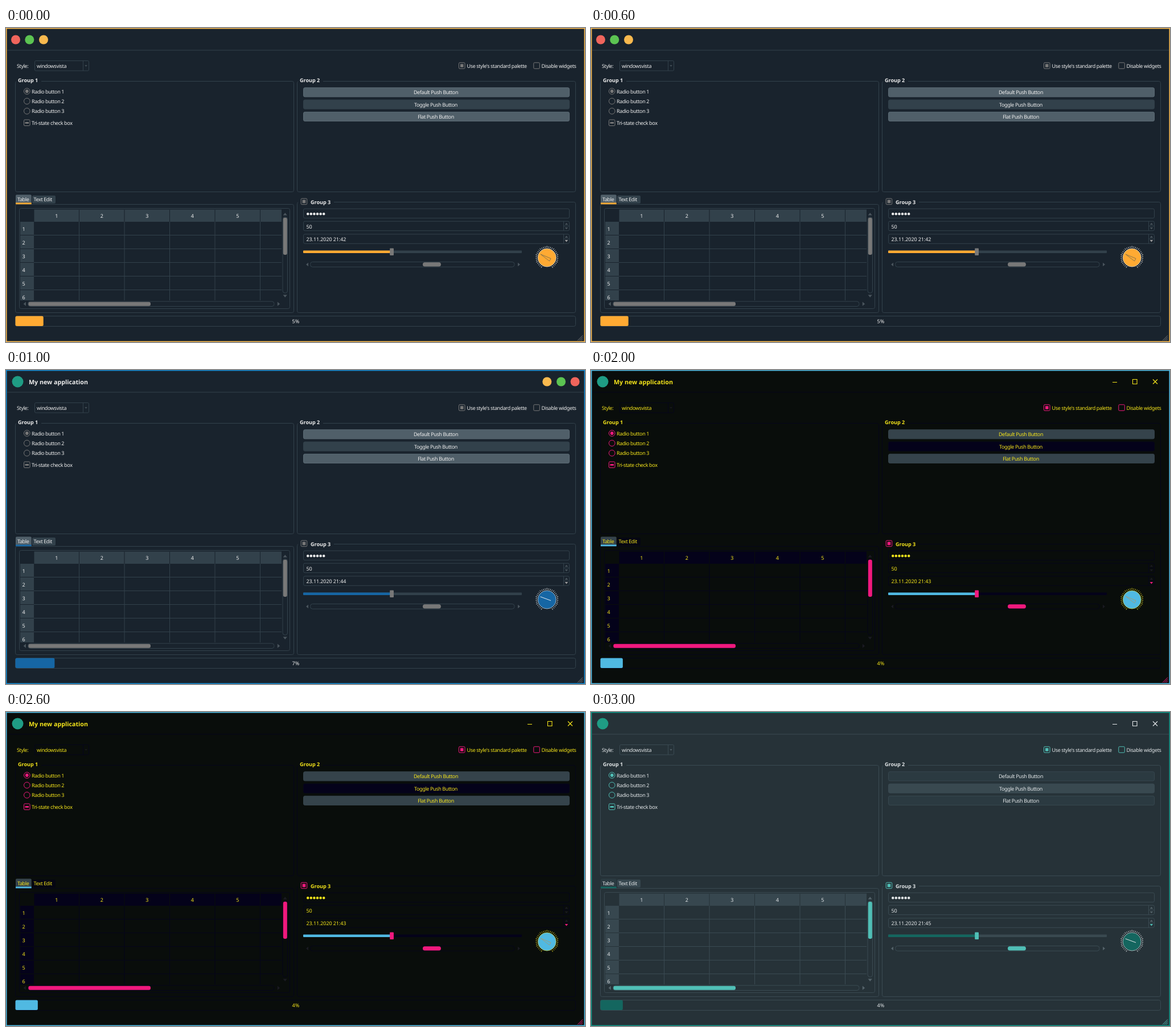
Recreate the animation shown at these times as an HTML page. Size 1017x551 px, loop 4000 ms.

```html
<!DOCTYPE html>
<html lang="en">
<head>
<meta charset="utf-8">
<title>Themed window</title>
<style>
html, body { margin: 0; width: 100%; height: 100%; overflow: hidden; background: #19232d; }
svg {
  display: block; width: 1017px; height: 551px;
  --bg: #19232d; --line: #32414b; --text: #eeeeee; --head: #32414b; --btn: #505f69; --btnLine: #5b6a74;
  --toggle: #32414b; --tab: #505f69; --tab2: #32414b; --grip: #787878; --arrow: #4a555d; --down: #a0a0a0;
  --groove: #32414b; --tick: #d8dcde;
}
.amber { --accent: #ffaa33; --frame: #f8b84e; --needle: #8a7448; }
.blue { --accent: #1666a4; --frame: #168bd2; --needle: #e6edf2; }
.neon {
  --bg: #090d0b; --line: #05051a; --text: #f5e51b; --head: #04021a; --btn: #35434b; --btnLine: #35434b;
  --toggle: #04021a; --tab: #35434b; --tab2: #050612; --grip: #f0197d; --arrow: #1a1a22; --down: #f0197d;
  --groove: #04021a; --tick: #d8cb1c; --accent: #50b9e2; --frame: #50b9e2; --needle: #9a9f80;
}
.teal {
  --bg: #263238; --line: #3a4a52; --text: #e2e6e8; --head: #37474f; --btn: #2b3a41; --btnLine: #37474f;
  --toggle: #394950; --tab: #2b3a41; --tab2: #37474f; --grip: #50bfb6; --arrow: #55636a; --down: #50bfb6;
  --groove: #394950; --accent: #14665f; --frame: #0c9385; --needle: #e2e6e8;
}
text { font: 9px "Noto Sans", "Open Sans", sans-serif; letter-spacing: -.38px; fill: var(--text); text-rendering: geometricPrecision; white-space: pre; }
.bold { font-weight: 700; letter-spacing: 0; }
.title { font-size: 10.7px; }
.num { letter-spacing: -.1px; }
.mid { text-anchor: middle; }
.bg { fill: var(--bg); }
.head { fill: var(--head); }
.grip { fill: var(--grip); }
.accent { fill: var(--accent); }
.groove { fill: var(--groove); }
.arrow { fill: var(--arrow); }
.down { fill: var(--down); }
.ink { fill: var(--text); }
.btn { fill: var(--btn); stroke: var(--btnLine); }
.toggle { fill: var(--toggle); stroke: var(--line); }
.tab { fill: var(--tab); }
.tab2 { fill: var(--tab2); }
.line, .check, .frame, .glyph, .ticks { fill: none; stroke: var(--line); }
.check { stroke: var(--grip); }
.frame { stroke: var(--frame); stroke-width: 2; }
.glyph { stroke: var(--text); stroke-width: 1.1; }
.ticks { stroke: var(--tick); }
.gripLines { fill: none; stroke: var(--grip); }
.cut { stroke: var(--bg); }
.disc { fill: var(--accent); stroke: var(--tick); stroke-width: .7; }
.needle { fill: var(--accent); stroke: var(--needle); stroke-width: 1; stroke-linejoin: round; }
</style>
</head>
<body>
<script>
const rect = (cls, x, y, x2, y2, r = 0) =>
  `<rect class="${cls}" x="${x}" y="${y}" width="${x2 - x}" height="${y2 - y}" rx="${r}"/>`;
const text = (s, x, y, cls = '', id = '') => `<text class="${cls}" id="${id}" x="${x}" y="${y}">${s}</text>`;
const path = (cls, d) => `<path class="${cls}" d="${d}"/>`;
const dot = (cls, x, y, r, fill = '') =>
  `<circle class="${cls}" cx="${x}" cy="${y}" r="${r}" ${fill && `fill="${fill}"`}/>`;
const range = (n, f) => Array.from({ length: n }, (_, i) => f(i)).join('');
const arrow = (x, y, turn, size = 2.8, cls = 'arrow') =>
  `<path class="${cls}" transform="translate(${x} ${y}) rotate(${turn}) scale(${size})" d="M-1 .6L1 .6L0 -.6z"/>`;
const checkbox = (x, y, mark = '') => rect('check', x, y, x + 10.5, y + 10.5, 1.5) + mark;
const group = (x, y, x2, y2, gap, gapEnd) =>
  rect('line', x, y, x2, y2, 3) + rect('bg', gap, y - 2, gapEnd, y + 2);

function titleBar() {
  const logo = dot('', 20.5, 20.5, 10, '#1f9c84');
  const red = '#f0655c', green = '#5cc452', yellow = '#f9b94e';
  const lights = (xs, colors) => xs.map((x, i) => dot('', x, 20.5, 8, colors[i])).join('');
  return path('line', 'M2 39H1015') +
    `<g data-on="amber">${lights([17, 41.3, 66], [red, green, yellow])}</g>` +
    `<g data-on="blue">${lights([950.3, 975, 999.5], [yellow, green, red])}</g>` +
    `<g data-on="blue neon teal">${logo}</g>` +
    `<g data-on="blue neon">${text('My new application', 40, 25, 'bold title')}</g>` +
    `<g data-on="neon teal">${path('glyph', 'M916 21.5H924M951.5 16.5H959V24.5H951.5zM987 16.5L995 24.5M995 16.5L987 24.5')}</g>`;
}

function toolBar() {
  return text('Style:', 19, 70) + rect('line', 50.5, 57.5, 145.5, 75, 2) + path('line', 'M135.5 58V75') +
    arrow(140.5, 66.5, 180, 2.2) + text('windowsvista', 54, 70) +
    checkbox(795.5, 60.8, rect('grip', 798, 63.3, 803.5, 68.8)) + text("Use style's standard palette", 809.5, 70) +
    checkbox(926.8, 60.8) + text('Disable widgets', 940.5, 70);
}

function topGroups() {
  const buttons = [['btn', 'Default'], ['toggle', 'Toggle'], ['btn', 'Flat']];
  return group(16.5, 93.5, 505.5, 287.5, 18, 62) + text('Group 1', 21, 95.3, 'bold') +
    range(3, i => dot('check', 36.8, 111 + 17.4 * i, 5.3) + text('Radio button ' + (i + 1), 45, 114.6 + 17.4 * i)) +
    dot('grip', 36.8, 111, 2.9) +
    checkbox(31.5, 161, rect('grip', 33.5, 165, 40, 167.8)) + text('Tri-state check box', 45, 170.3) +
    group(511.5, 93.5, 1000.5, 287.5, 513, 557) + text('Group 2', 516, 95.3, 'bold') +
    buttons.map(([cls, name], i) => {
      const y = 104.8 + 21.3 * i;
      return rect(cls, 522.5, y, 989.5, y + 16, 2.5) + text(name + ' Push Button', 755, y + 11.5, 'mid');
    }).join('');
}

function table() {
  const colX = i => 128.5 + 79.5 * i;
  const rowY = i => 363.5 + 24 * i;
  return rect('line', 16.5, 309.5, 505.5, 499.5, 3) +
    rect('tab', 17, 292.5, 44.7, 309, 2) + rect('accent', 17, 306.5, 44.7, 309.3) + rect('tab2', 46, 294, 87, 308, 2) +
    text('Table', 20, 304) + text('Text Edit', 48.5, 304.3) +
    rect('line', 23.5, 316.5, 498.5, 492.5, 3) +
    rect('head', 49.5, 318.5, 484, 340) + rect('head', 25, 340, 49, 478) +
    range(5, i => path('line', `M${colX(i)} 340V478M49 ${rowY(i)}H484`) +
      path('cut', `M${colX(i)} 319V340M25 ${rowY(i)}H49`) + text(i + 1, colX(i) - 39.7, 333, 'mid num')) +
    range(6, i => text(i + 1, 28.5, rowY(i) - 7.5, 'num')) +
    rect('bg', 25, 478, 484, 479) +
    rect('line', 486, 331.5, 494.5, 465, 4) + rect('grip', 486.8, 332.8, 493.8, 398, 3) +
    arrow(490.2, 326.5, 0, 3.6) + arrow(490.2, 470.5, 180, 3.6) +
    rect('line', 38.5, 479.8, 471, 488.5, 4) + rect('grip', 39.3, 480.7, 254, 487.7, 3) +
    arrow(32.8, 484.2, -90, 3.6) + arrow(479, 484.2, 90, 3.6);
}

function dial() {
  const ticks = range(33, i => {
    const a = (120 + 300 * i / 32) * Math.PI / 180;
    const at = r => `${(950.2 + r * Math.cos(a)).toFixed(2)} ${(403 + r * Math.sin(a)).toFixed(2)}`;
    return `M${at(17.5)}L${at(i % 4 ? 19.8 : 20.5)}`;
  });
  return path('ticks', ticks) + dot('disc', 950.2, 403, 16) +
    `<g data-on="amber neon">${path('needle', 'M939 397L957 404.5L954.5 409z')}</g>` +
    `<g data-on="blue teal">${path('needle', 'M938.5 397.8L957 404.6')}</g>`;
}

function inputs() {
  return group(511.5, 305.5, 1000.5, 499.5, 513, 576) +
    checkbox(518.2, 299.2, rect('grip', 520.6, 301.6, 526.3, 307.3)) + text('Group 3', 535, 308.5, 'bold') +
    [317.2, 339.2, 361.8].map(y => rect('line', 522.5, y, 989.5, y + 16.5, 2.5)).join('') +
    range(6, i => dot('ink', 530.2 + 5.6 * i, 326.2, 2.2)) +
    text('50', 527.5, 351.7, 'num') + text('', 527.5, 374, 'num', 'date') +
    path('line', 'M979.5 339V355.7M979.5 347.5H989.5M979.5 362V378M979.5 370H989.5') +
    arrow(984.4, 343.6, 0) + arrow(984.4, 351.6, 180) + arrow(984.4, 366.2, 0) + arrow(984.4, 373.8, 180, 2.8, 'down') +
    rect('groove', 522, 390.5, 906, 395, 1) + rect('accent', 522, 390.5, 676, 395, 1) +
    rect('grip', 674.2, 386.5, 681, 399, 1) +
    rect('line', 534.5, 410.5, 893, 419.3, 4) + rect('grip', 732, 411.3, 764, 418.5, 3.5) +
    arrow(529, 415, -90, 3.3) + arrow(901, 415, 90, 3.3) + dial();
}

const progress = rect('line', 16.5, 505.5, 1000.5, 523.5, 3) +
  '<rect class="accent" id="bar" x="16.5" y="505.5" height="17.5" rx="2.5"/>' + text('', 508.8, 517.6, 'mid num', 'percent');

document.body.innerHTML = `<svg viewBox="0 0 1017 551">${rect('bg', 0, 0, 1017, 551)}` +
  titleBar() + toolBar() + topGroups() + table() + inputs() + progress +
  path('gripLines', 'M1004 548.5L1013 539.5M1007 548.5L1013 542.5M1010 548.5L1013 545.5') +
  rect('frame', .5, .5, 1016.5, 550.5) + '</svg>';

const themes = [
  { name: 'amber', minute: 42, percent: 5 },
  { name: 'blue', minute: 44, percent: 7 },
  { name: 'neon', minute: 43, percent: 4 },
  { name: 'teal', minute: 45, percent: 4 },
];
const svg = document.querySelector('svg');
const byId = id => document.getElementById(id);
let shown;

function show(theme) {
  if (theme === shown) return;
  shown = theme;
  svg.setAttribute('class', theme.name);
  for (const part of svg.querySelectorAll('[data-on]'))
    part.style.display = part.dataset.on.split(' ').includes(theme.name) ? '' : 'none';
  byId('date').textContent = '23.11.2020 21:' + theme.minute;
  byId('percent').textContent = theme.percent + '%';
  byId('bar').setAttribute('width', 984 * theme.percent / 100);
}

const start = performance.now();
function tick() {
  show(themes[Math.floor((performance.now() - start) / 1000) % themes.length]);
  requestAnimationFrame(tick);
}
tick();
</script>
</body>
</html>
```
